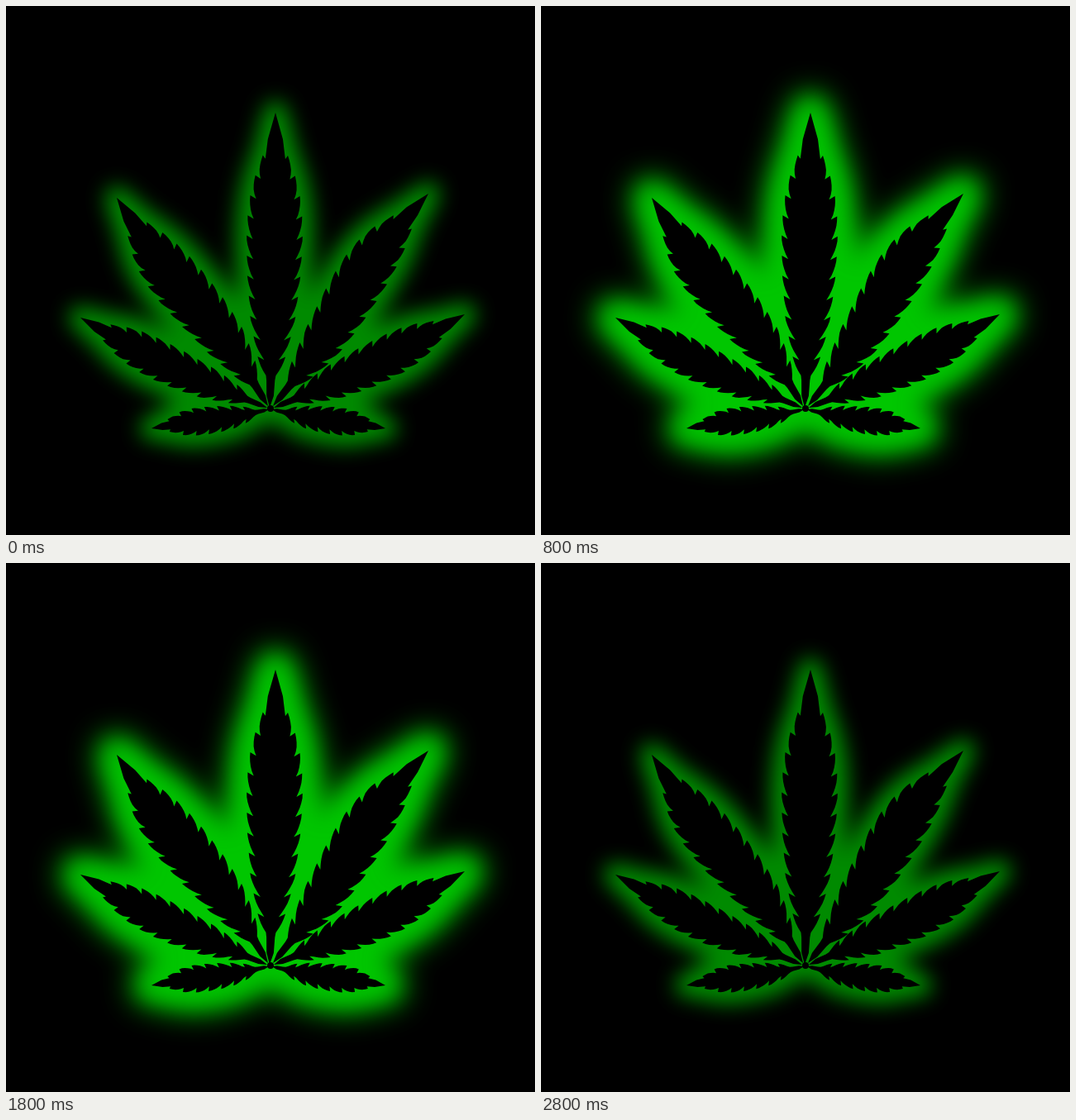
Recreate the animation shown at these times as an HTML page. Size 640 px wide and 640 px high, loop 3 s.

```html
<!DOCTYPE html>
<html lang="en">
<head>
<meta charset="utf-8">
<title>Glowing leaf</title>
<style>
  html, body { margin: 0; height: 100%; overflow: hidden; background: #000; }
  svg { display: block; width: 100vw; height: 100vh; }
  .glow { fill: currentColor; stroke: currentColor; stroke-linejoin: round; }
  .dim { color: #008a00; stroke-width: 28px; }
  .bright { color: #00c600; stroke-width: 48px; animation: bright 3s step-end infinite; }
  .peak { color: #00d000; stroke-width: 50px; animation: peak 3s step-end infinite; }
  @keyframes bright {
    0%, 13.33%, 33.33%, 53.33%, 66.66%, 86.66%, 100% { opacity: 0; }
    6.66%, 26.66%, 46.66%, 60%, 80% { opacity: 1; }
  }
  @keyframes peak {
    0%, 40%, 93.33%, 100% { opacity: 0; }
    33.33%, 86.66% { opacity: 1; }
  }
</style>
</head>
<body>
<svg viewBox="0 0 640 640">
  <defs>
    <path id="leaf"/>
    <filter id="soft" filterUnits="userSpaceOnUse" x="0" y="0" width="640" height="640">
      <feGaussianBlur stdDeviation="12"/>
    </filter>
    <filter id="wide" filterUnits="userSpaceOnUse" x="0" y="0" width="640" height="640">
      <feGaussianBlur stdDeviation="18"/>
    </filter>
  </defs>
  <g class="glow dim"><use href="#leaf" filter="url(#soft)"/></g>
  <g class="glow bright"><use href="#leaf" filter="url(#wide)"/></g>
  <g class="glow peak"><use href="#leaf" filter="url(#wide)"/></g>
  <use href="#leaf"/>
  <circle cx="320" cy="487" r="4"/>
</svg>
<script>
  // Relative half width along a leaflet, from tip (0) to base (1).
  const profile = [
    [0, 0], [.09, .29], [.15, .46], [.2, .67], [.27, .87], [.35, .97], [.43, 1],
    [.55, .95], [.7, .8], [.8, .57], [.88, .35], [.95, .15], [1, .04]
  ];

  // bow and sway bend the midrib towards the right-hand side, seen from tip to base.
  const leaflets = [
    { tip: [326, 129], base: [319, 486], width: 34, teeth: 11, bow: -2, sway: 0 },
    { tip: [134, 232], base: [317, 484], width: 32, teeth: 11, bow: -1.5, sway: 3.5 },
    { tip: [511, 227], base: [323, 484], width: 31, teeth: 10, bow: 3, sway: 4.5 },
    { tip: [90, 377], base: [316, 486], width: 24, teeth: 10, bow: 5.5, sway: 0 },
    { tip: [555, 373], base: [324, 486], width: 26, teeth: 10, bow: -5.5, sway: 0 },
    { tip: [176, 511], base: [318, 488], width: 17, teeth: 7, bow: 1.5, sway: -1 },
    { tip: [459, 511], base: [322, 488], width: 17, teeth: 7, bow: -1.5, sway: 1 }
  ];
  const firstTooth = .145, toothedPart = .75, samples = 5;

  function widthAt(u) {
    const i = Math.max(1, profile.findIndex(([x]) => x >= u));
    const [x0, y0] = profile[i - 1], [x1, y1] = profile[i];
    return y0 + (y1 - y0) * (u - x0) / (x1 - x0);
  }

  function leafletPath({ tip, base, width, teeth, bow, sway }) {
    const dx = base[0] - tip[0], dy = base[1] - tip[1], length = Math.hypot(dx, dy);
    const depth = 3.5 + width * .12;
    const step = toothedPart / teeth;

    const point = (u, side, inset = 0) => {
      const half = widthAt(u) * width;
      const bend = bow * Math.sin(Math.PI * u) + sway * Math.sin(2 * Math.PI * u);
      const off = bend + side * (half - Math.min(inset * depth, half * .45));
      const x = tip[0] + dx * u - dy / length * off;
      const y = tip[1] + dy * u + dx / length * off;
      return x.toFixed(1) + ' ' + y.toFixed(1);
    };

    // Each tooth curves inwards to a notch just behind the point of the next one.
    const edge = side => {
      const points = [point(.09, side, .1), point(firstTooth + .012, side, .6)];
      for (let i = 0; i < teeth; i++) {
        for (let k = 0; k <= samples; k++) {
          const t = k / samples;
          points.push(point(firstTooth + i * step + t * (step + .012), side, t * t));
        }
      }
      return points.concat(point(.96, side));
    };

    return `M${[tip, ...edge(1), base, ...edge(-1).reverse()].join(' L')} Z`;
  }

  document.getElementById('leaf').setAttribute('d', leaflets.map(leafletPath).join(' '));
</script>
</body>
</html>
```
